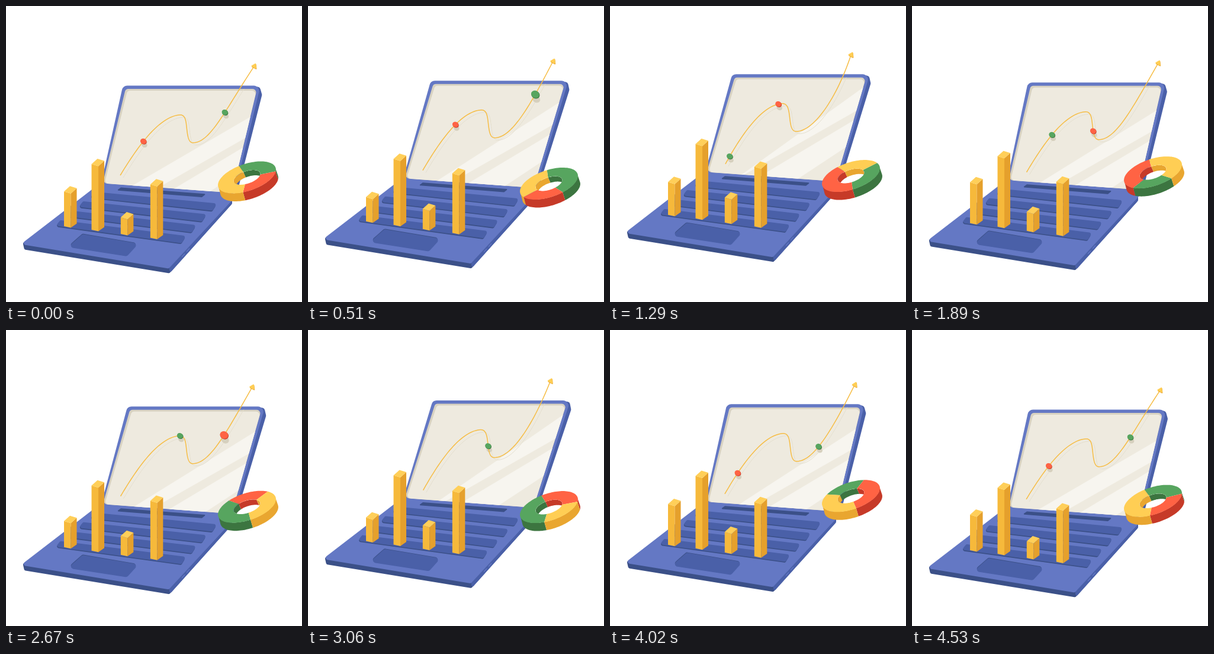
An HTML page with a canvas that plays this animation: 500x500 px, repeating every 4.56 s.

```html
<!DOCTYPE html>
<html lang="en">
<head>
<meta charset="utf-8">
<title>Laptop analytics</title>
<style>
  html, body { margin: 0; width: 100%; height: 100%; overflow: hidden; background: #fff; }
  canvas { display: block; width: 100vw; height: 100vh; }
</style>
</head>
<body>
<canvas id="stage" width="500" height="500"></canvas>
<script>
const ctx = document.getElementById('stage').getContext('2d');
const LOOP = 4560, HALF = LOOP / 2, STEP = 30;
const BLUE = '#6478c4', BLUE_MID = '#4a60a8', BLUE_DARK = '#3b5088';
const YELLOW = ['#ffce54', '#e9a630'], GREEN = ['#57a55f', '#3c7540'], RED = ['#ff6344', '#c63a28'];

const wave = (t, peak) => Math.cos((t - peak) / HALF * 2 * Math.PI);
const clamp = x => Math.min(1, Math.max(0, x));

function polyPath(points, radius = 0) {
  const n = points.length, [lx, ly] = points[n - 1], [fx, fy] = points[0];
  ctx.beginPath();
  if (radius) {
    ctx.moveTo((lx + fx) / 2, (ly + fy) / 2);
    points.forEach((p, i) => ctx.arcTo(...p, ...points[(i + 1) % n], radius));
  } else {
    points.forEach(p => ctx.lineTo(...p));
  }
  ctx.closePath();
}

function poly(points, color, radius) {
  polyPath(points, radius);
  ctx.fillStyle = color;
  ctx.fill();
}

const moved = (points, dx, dy) => points.map(([x, y]) => [x + dx, y + dy]);

// ---- Laptop ----
function drawBase() {
  poly([[28, 398], [275, 437], [380, 322], [381, 335], [276, 451.5], [31, 411.5]], BLUE_DARK, 3);
  poly([[275, 440], [382, 322], [382, 334], [277, 451]], BLUE_MID, 2);
  poly([[162, 297], [384, 314], [383, 327], [275, 443.5], [25, 402.5]], BLUE, 3.5);
  ctx.strokeStyle = BLUE;
  ctx.lineWidth = 1.3;
  ctx.beginPath();
  for (const [x, y] of [[297, 424], [305, 415]]) {
    ctx.moveTo(x, y);
    ctx.lineTo(x + 5, y - 5.5);
  }
  ctx.stroke();

  poly([[194, 306.5], [338, 317.5], [331, 323], [187, 311.5]], BLUE_DARK, 1);
  for (let i = 0; i < 4; i++) {
    const lx = i * 19.3, ly = i * -16, rx = i * 17.4, ry = i * -18.3;
    const row = [[91 + lx, 363.5 + ly], [303.5 + rx, 390 + ry], [296 + rx, 402.3 + ry], [83.5 + lx, 373 + ly]];
    poly(row, BLUE_DARK, 3);
    poly(moved(row, 0.6, -1.6), BLUE_MID, 3);
  }
  const pad = [[129, 384.5], [223.5, 400.5], [204, 422], [104, 406.5]];
  poly(pad, BLUE_DARK, 4.5);
  poly(moved(pad, 0.3, 0.9), BLUE_MID, 4.5);
}

function drawScreen(lean, rise) {
  const tilt = points => points.map(([x, y]) => [x + lean * (300 - y) / 166, y]);
  const glass = tilt([[202, 140], [424, 140], [382, 315.5], [163.5, 299.5]]);
  poly(tilt([[420, 135.5], [429, 137.5], [432.5, 150], [391, 313], [380, 313]]), BLUE_MID, 5);
  poly(tilt([[197.5, 134.5], [430, 134.5], [386, 315], [160, 303]]), BLUE, 9);
  poly(glass, '#d8d2c1', 6);
  ctx.save();
  polyPath(glass, 6);
  ctx.clip();
  poly(tilt([[205, 143], [423, 143], [382, 316], [166.5, 300]]), '#eeeadf', 6);
  // Reflections glide upwards as the laptop rises
  const line = (x, y, slope) => moved([[x - 280, y + 280 * slope], [x + 40, y - 40 * slope]], 0, -21 * rise);
  const stripe = (a, b) => poly([a[0], a[1], b[1], b[0]], '#f7f5ef');
  stripe(line(415, 186, 0.583 + 0.14 * rise), line(406, 222, 0.57));
  stripe(line(402, 238, 0.598), line(392, 282, 0.66));
  ctx.restore();
  return glass;
}

// ---- Trend line: Bézier points as [x, y, sideways shift when raised] ----
const TREND = [
  [193, 286, 2], [215, 250, 0], [255, 187, -3],
  [293, 184, -3], [304, 183, -3], [304, 196, -2],
  [305.5, 208, -2], [307, 222, -2], [309, 231, -2],
  [316, 231, -1.5], [345, 231, -1], [370, 176, 13], [419, 102, -12.5]
];
const SAMPLES = 120, CURVES = (TREND.length - 1) / 3;

function trendPoint(fraction, rise) {
  const u = fraction * CURVES, i = Math.min(Math.floor(u), CURVES - 1), t = u - i, s = 1 - t;
  const [a, b, c, d] = TREND.slice(i * 3, i * 3 + 4);
  const mix = k => s * s * s * a[k] + 3 * s * s * t * b[k] + 3 * s * t * t * c[k] + t * t * t * d[k];
  return [mix(0) + rise * mix(2), mix(1)];
}

const trendPoints = rise => Array.from({ length: SAMPLES + 1 }, (_, i) => trendPoint(i / SAMPLES, rise));

const LENGTHS = [0];
trendPoints(0).reduce((a, b) => {
  LENGTHS.push(LENGTHS[LENGTHS.length - 1] + Math.hypot(b[0] - a[0], b[1] - a[1]));
  return b;
});

function pointAtLength(length, rise) {
  const i = Math.max(1, LENGTHS.findIndex(l => l >= length));
  const part = (length - LENGTHS[i - 1]) / (LENGTHS[i] - LENGTHS[i - 1]);
  return trendPoint((i - 1 + part) / SAMPLES, rise);
}

function strokeTrend(rise, dx, dy, color, width) {
  ctx.beginPath();
  moved(trendPoints(rise), dx, dy).forEach(p => ctx.lineTo(...p));
  ctx.strokeStyle = color;
  ctx.lineWidth = width;
  ctx.stroke();
}

function disc(x, y, r, color) {
  ctx.beginPath();
  ctx.ellipse(x, y, r, r * 0.86, 0.5, 0, 2 * Math.PI);
  ctx.fillStyle = color;
  ctx.fill();
}

// Each dot travels once per loop; ease maps trip progress to distance
const TRIP = 4200;
const DOTS = [
  { color: RED, start: 3200, ease: p => 0.65 * p + 0.28 * p ** 6 },
  { color: GREEN, start: 1150, ease: p => 1.4 * p - 0.43 * p * p }
];

function placeDot({ color, start, ease }, t, rise) {
  const p = (t - start + LOOP) % LOOP / TRIP;
  const swell = 2 * clamp((p - 0.83) / 0.1);
  const r = (5.4 + swell) * clamp(p / 0.03) * clamp((1.02 - p) / 0.05);
  return { color, r, at: pointAtLength(330 * ease(Math.min(p, 1)), rise) };
}

function drawTrend(t, rise, glass) {
  const dots = DOTS.map(dot => placeDot(dot, t, rise));
  ctx.save();
  polyPath(glass, 6);
  ctx.clip();
  strokeTrend(rise, 5, 4, '#e3dece', 1);
  for (const { r, at: [x, y] } of dots) disc(x + 1.8, y + r + 0.8, r * 0.9, '#d6d0be');
  ctx.restore();
  strokeTrend(rise, 0, 0, '#f6bd45', 1.5);

  const [ax, ay] = trendPoint(1, rise);
  const head = [[ax + 3, ay - 5.5], [ax - 5.5, ay - 0.5], [ax + 4, ay + 4.5]];
  poly(moved(head, 0.6, 1.2), YELLOW[1], 1);
  poly(head, YELLOW[0], 1);

  for (const { color, r, at: [x, y] } of dots) {
    disc(x + 0.4, y + 0.5, r, color[1]);
    disc(x - 0.1, y - 0.1, r * 0.96, color[0]);
  }
}

// ---- Bars ----
function drawBar(x, bottom, top) {
  const left = [x, top + 9], back = [x + 10, top], right = [x + 21.5, top + 3.5], front = [x + 11.5, top + 12.5];
  poly([left, front, [x + 11.5, bottom], [x, bottom - 2.5]], '#f6b93b');
  poly([front, right, [x + 21.5, bottom - 7], [x + 11.5, bottom]], '#e5a02c');
  poly([left, back, right, front], '#ffcf59');
}

function drawBars(t, rise) {
  drawBar(98, 374.5, 308.8 + 15 * wave(t, 685));
  drawBar(144.5, 380.5, 251.3 + 8.4 * wave(t, 240));
  drawBar(193.8, 387.5, 348 - 15 * rise);
  drawBar(243.8, 394, 285.7 + 8.1 * wave(t, 2055));
}

// ---- Ring chart: three equal parts seen at a slant ----
function drawRing(t) {
  const cx = 407, cy = 290.3 + 10 * wave(t, 600);
  const tilt = -0.3257, ux = Math.cos(tilt), uy = Math.sin(tilt);
  const point = (deg, scale, dx = 0, dy = 0) => {
    const a = deg * Math.PI / 180;
    const p = 51.1 * scale * Math.cos(a), q = 22.7 * scale * Math.sin(a);
    return [cx + dx + p * ux - q * uy, cy + dy + p * uy + q * ux];
  };
  const arc = (a, b, ...shape) => {
    const n = Math.max(2, Math.ceil((b - a) / 3));
    return Array.from({ length: n + 1 }, (_, i) => point(a + (b - a) * i / n, ...shape));
  };
  const band = (a, b, from, to, color) => {
    if (b > a) poly([...arc(a, b, ...from), ...arc(a, b, ...to).reverse()], color);
  };

  // Foreshortening makes the seams linger at the near and far sides
  const seam = turn => 248 + turn - 22 * Math.cos((turn - 66) * Math.PI / 90);
  const parts = [GREEN, RED, YELLOW].map((color, i) => {
    const turn = t / LOOP * 360 + i * 120;
    const a = seam(turn), b = seam(turn + 120), whole = Math.floor(a / 360) * 360;
    return [a - whole, b - whole, color];
  });
  const hole = 0.46;
  const wall = (from, sweep, inner, outer) => {
    for (const [a, b, color] of parts)
      for (const k of [from, from + 360])
        band(Math.max(a, k), Math.min(b, k + sweep), inner, outer, color[1]);
  };

  ctx.save();
  polyPath(arc(0, 360, hole));
  ctx.clip();
  wall(180, 180, [hole], [hole, 4, 9]);
  ctx.restore();
  wall(0, 181, [0.99], [1, 4, 13.5]);
  for (const [a, b, color] of parts) band(a, b, [1], [hole], color[0]);
}

function draw(t) {
  const rise = (1 - wave(t, 0)) / 2;
  const lean = 7.8 * (wave(0, 2010) - wave(t, 2010));
  ctx.clearRect(0, 0, 500, 500);
  ctx.save();
  ctx.translate(0, -20 * rise);
  drawBase();
  const glass = drawScreen(lean, rise);
  drawTrend(t, rise, glass);
  drawBars(t, rise);
  ctx.restore();
  drawRing(t);
}

function tick() {
  draw(Math.floor(performance.now() % LOOP / STEP) * STEP);
  requestAnimationFrame(tick);
}
tick();
</script>
</body>
</html>
```
